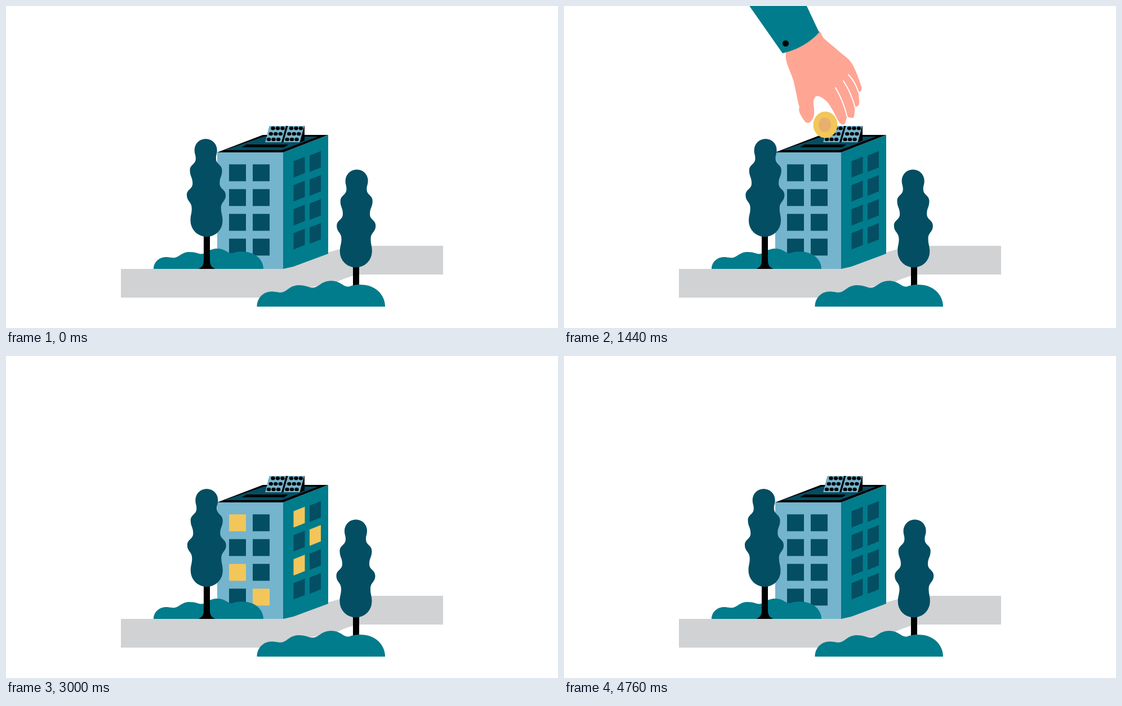
An HTML page with a canvas that plays this animation: 980x572 px, repeating every 4.8 s.

```html
<!DOCTYPE html>
<html lang="en">
<head>
<meta charset="utf-8">
<title>Solar savings</title>
<style>
  html, body { margin: 0; width: 100%; height: 100%; overflow: hidden; background: #fff; }
  canvas { display: block; }
</style>
</head>
<body>
<canvas id="stage" width="980" height="572"></canvas>
<script>
const ctx = document.getElementById('stage').getContext('2d');
const LOOP = 4800, SWAY = 2400;
const TEAL = '#007c8c', DARK = '#034e63', SKY = '#74b4cd', YELLOW = '#f3c65a', SKIN = '#ffa594', ROAD = '#d1d2d4';

const road = new Path2D('M204 467H470L500 455L571 438C600 429 620 426 650 426H776V477H636C615 477 602 484 585 491L450 518H204Z');
const bush = new Path2D('M0 0C0-12 10-21 22-21C30-21 33-19 38-20C47-22 50-30 64-30C78-30 80-25 88-27C96-29 99-36 113-36C128-36 131-27 140-28C147-30 150-31 160-30.500C181-30 195-16 195 0Z');
const trunk = new Path2D('M351 400H362V452C362 461 366 465 372 467H341C347 465 351 461 351 452Z');
const sleeve = new Path2D('M0 0Q39-9 65-37L-35-250L-175-250Z');
const crown = crownPath();

// Open hand, measured from the left corner of the cuff; THUMB points lie over the coin.
const WRIST = [30, -10];
const HAND = [
  [7, -4], [20, 51], [30, 96], [40, 121], [50, 121], [56, 107], [55, 83], [63, 76], [78, 85], [89, 101],
  [101, 123], [110, 126], [115, 114], [126, 114], [129, 97], [136, 90], [135, 70], [139, 67], [139, 56],
  [123, 18], [102, -2], [75, -25], [58, -40]];
const THUMB = [2, 8];
const CREASES = [[[94, 61], [115, 114]], [[108, 49], [129, 97]], [[117, 38], [135, 70]]];

function ease(t, from, to) {
  const p = Math.min(1, Math.max(0, (t - from) / (to - from)));
  return p * p * (3 - 2 * p);
}

function fill(color, path) {
  ctx.fillStyle = color;
  ctx.fill(path);
}
function poly(color, ...points) {
  fill(color, new Path2D('M' + points.join(' ') + 'Z'));
}
function ellipse(color, x, y, rx, ry = rx) {
  const p = new Path2D();
  p.ellipse(x, y, rx, ry, 0, 0, 7);
  fill(color, p);
}
function placed(matrix, draw) {
  ctx.save();
  ctx.transform(...matrix);
  draw();
  ctx.restore();
}

// Closed curve through the given points.
function smooth(points) {
  const path = new Path2D(), n = points.length, at = i => points[(i + n) % n];
  path.moveTo(...at(0));
  for (let i = 0; i < n; i++) {
    const [a, b, c, d] = [at(i - 1), at(i), at(i + 1), at(i + 2)];
    path.bezierCurveTo(b[0] + (c[0] - a[0]) / 6, b[1] + (c[1] - a[1]) / 6,
      c[0] - (d[0] - b[0]) / 6, c[1] - (d[1] - b[1]) / 6, ...c);
  }
  return path;
}

// Wavy crown: half-widths of lobes and waists, mirrored, with round ends.
function crownPath() {
  const side = [[20, -154], [18, -139], [28.5, -118], [24, -95], [34.5, -74], [26, -51], [28.5, -28.5]];
  const path = new Path2D();
  const run = (points, sign) => points.slice(1).forEach(([w, y], i) => {
    const [w0, y0] = points[i], mid = (y0 + y) / 2;
    path.bezierCurveTo(sign * w0, mid, sign * w, mid, sign * w, y);
  });
  path.arc(0, -154, 20, Math.PI, 0);
  run(side, 1);
  path.arc(0, -28.5, 28.5, 0, Math.PI);
  run(side.reverse(), -1);
  return path;
}

// Lit windows as side, column and row, in the order they switch on.
const litOrder = ['front13', 'side02', 'front00', 'side11', 'front02', 'side00'];
function windowColor(id, t) {
  const i = litOrder.indexOf(id);
  return i >= 0 && t >= 1760 + i * 100 && t < 4000 + i * 80 ? YELLOW : DARK;
}

function building(t) {
  poly(SKY, 375, 260, 493, 260, 493, 467, 375, 467);
  poly(TEAL, 492, 260, 572, 229, 572, 440, 510, 463, 492, 467);
  poly('#000', 375, 260, 456, 229, 572, 229, 492, 260);
  poly(DARK, 388, 256, 458, 232, 554, 232, 490, 256);
  poly('#000', 427, 246, 501, 246, 494, 251, 419, 251);
  for (let row = 0; row < 4; row++) {
    for (let col = 0; col < 2; col++) {
      ctx.fillStyle = windowColor(`front${col}${row}`, t);
      ctx.fillRect(396 + 42 * col, 281.3 + 44 * row, 30, 30);
      const x = 510.5 + 28.5 * col, y = 275.7 + 42.6 * row - 10 * col;
      poly(windowColor(`side${col}${row}`, t), x, y, x + 20, y - 8, x + 20, y + 21, x, y + 29);
    }
  }
  poly('#000', 468, 213, 530, 213, 530, 239, 522, 242, 460, 242);
  for (const x of [468, 500.5]) {
    poly(SKY, x, 213, x + 29, 213, x + 21, 242, x - 8, 242);
    for (let i = 0; i < 9; i++) {
      const row = Math.floor(i / 3);
      ellipse('#000', x + 6 + (i % 3) * 8.5 - row * 3.7, 217.3 + row * 9.8, 3.7, 3.2);
    }
  }
}

function coin(x, y) {
  ctx.save();
  ctx.beginPath();
  ctx.rect(0, 0, 980, 249);
  ctx.clip();
  ellipse(YELLOW, x, y, 21.5, 23.5);
  ellipse('#e8b06c', x - 1, y, 11, 13);
  ctx.restore();
}

// Turns a point about the wrist: far points turn most, the thumb side hardly.
function bend([px, py], curl) {
  const x = px - WRIST[0], y = py - WRIST[1], r = Math.hypot(x, y);
  const weight = curl * r / 150 * Math.min(1, Math.max(0, Math.atan2(x, y) / 0.52));
  const angle = weight * 0.3, scale = 1 - weight * 0.065;
  return [WRIST[0] + scale * (x * Math.cos(angle) - y * Math.sin(angle)),
    WRIST[1] + scale * (x * Math.sin(angle) + y * Math.cos(angle))];
}

function hand(t) {
  const away = 1 - ease(t, 600, 1200) + ease(t, 2265, 2800);
  const release = ease(t, 1040, 1400), relax = ease(t, 1500, 1900), close = ease(t, 2050, 2380);
  const curl = 1 - release + 0.2 * relax + 0.8 * close, turn = relax - close;
  const x = 388 + 6 * turn - 95 * away, y = 84 + turn - 226 * away;
  const outline = HAND.map(p => bend(p, curl));
  const cos = Math.cos(0.061 * turn), sin = -Math.sin(0.061 * turn);
  const frame = [cos, sin, -sin, cos, x, y];

  placed(frame, () => {
    fill(SKIN, smooth(outline));
    ctx.strokeStyle = '#fff';
    ctx.lineWidth = 1.9;
    ctx.lineCap = 'round';
    for (const [a, b] of CREASES) {
      const mid = [(a[0] + b[0]) / 2 + 4, (a[1] + b[1]) / 2 - 2];
      ctx.stroke(new Path2D(`M${bend(a, curl)}Q${bend(mid, curl)} ${bend(b, curl)}`));
    }
  });
  const fall = Math.max(0, t - 1460) / 200;
  if (fall < 1) coin(x + 52 + 24 * release, y + 109 + 18 * release + 64 * fall * fall);
  placed(frame, () => {
    fill(SKIN, smooth(outline.slice(...THUMB)));
    fill(TEAL, sleeve);
    ellipse('#000', 5.5, -17.5, 5.6);
  });
}

function draw(t) {
  const lean = 0.0105 * Math.cos(2 * Math.PI * t / SWAY);
  ctx.fillStyle = '#fff';
  ctx.fillRect(0, 0, 980, 572);
  fill(ROAD, road);
  building(t);
  placed([1, 0, 0, 1, 262, 467], () => fill(TEAL, bush));
  fill('#000', trunk);
  placed([1, 0, lean, 1, 356.3, 410], () => fill(DARK, crown));
  ctx.fillStyle = '#000';
  ctx.fillRect(616, 455, 11, 50);
  placed([1, 0, -lean, 1, 621, 464.5], () => fill(DARK, crown));
  placed([1.167, 0, 0, 1.27, 445.5, 534], () => fill(TEAL, bush));
  if (t > 600 && t < 2800) hand(t);
}

function frame() {
  draw(performance.now() % LOOP);
  requestAnimationFrame(frame);
}
frame();
</script>
</body>
</html>
```
